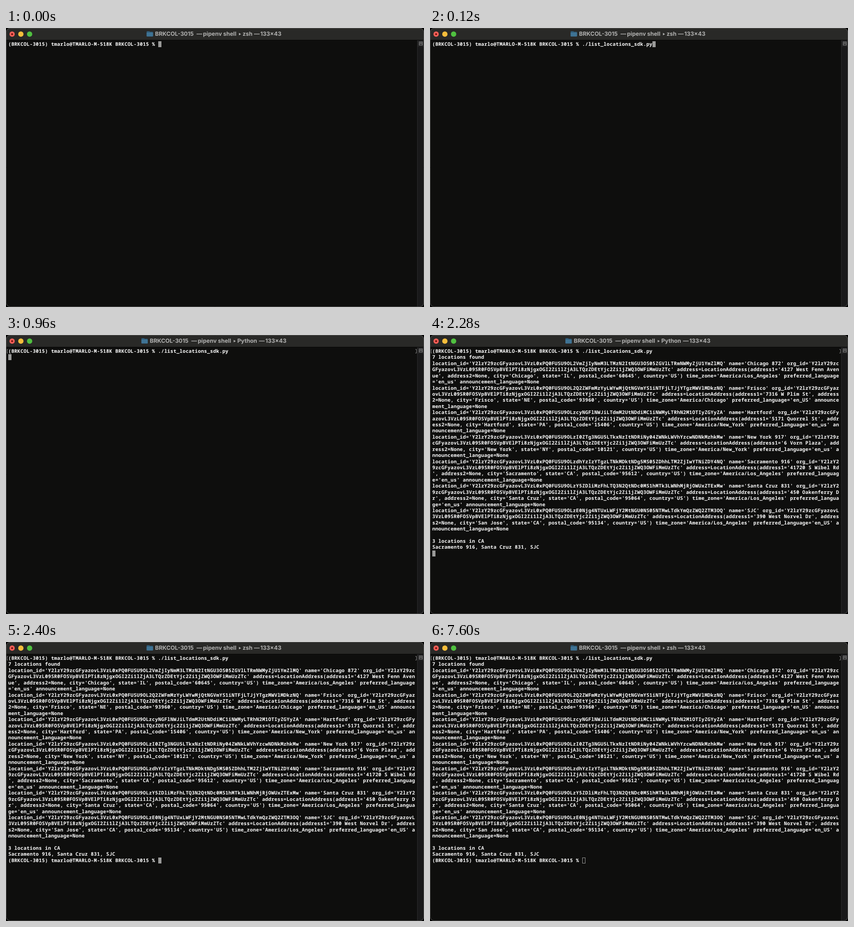
Animation, 917 px wide and 611 px high, one loop 9.36 s. Source, as an HTML page with a canvas:

```html
<!DOCTYPE html>
<html lang="en">
<head>
<meta charset="utf-8">
<title>Terminal</title>
<style>
  html, body { margin: 0; width: 100%; height: 100%; overflow: hidden; background: #000; }
  canvas { display: block; width: 917px; height: 611px; }
</style>
</head>
<body>
<canvas id="stage" width="917" height="611"></canvas>
<script>
const ctx = document.getElementById('stage').getContext('2d');
const W = 917, H = 611, LOOP = 9360;
const COLS = 133, CELL_W = 6.71, CELL_H = 13.42, LEFT = 4.8, TOP = 28.8;
const MONO = '600 10.7px "Noto Sans Mono", "DejaVu Sans Mono", monospace';
const SANS = '700 12.4px Inter, Roboto, sans-serif';

const PROMPT = '(BRKCOL-3015) tmarlo@TMARLO-M-518K BRKCOL-3015 % ';
const COMMAND = './list_locations_sdk.py';
const LOC = 'Y2lzY29zcGFyazovL3VzL0xPQ0FUSU9OL';
const ORG = 'Y2lzY29zcGFyazovL3VzL09SR0FOSVpBVElPTi8zNjgxOGI2Zi1lZjA3LTQzZDEtYjc2Zi1jZWQ3OWFiMmUzZTc';

// id, name, street, city, state, postal code, time zone, language
const places = [
  ['2VmZjIyNmM3LTMzN2ItNGU3OS05ZGVlLTRmNWMyZjU1YmZlMQ', 'Chicago 872', '4127 West Fenn Avenue', 'Chicago', 'IL', '60645', 'Los_Angeles', 'en_us'],
  ['2Q2ZWFmMzYyLWYwMjQtNGVmYS1iNTFjLTJjYTgzMWVlMDkzNQ', 'Frisco', '7316 W Plim St', 'Frisco', 'NE', '93960', 'Chicago', 'en_US'],
  ['zcyNGFlNWJiLTdmM2UtNDdiMC1iNWMyLTRhN2M1OTIyZGYyZA', 'Hartford', '5171 Quorrel St', 'Hartford', 'PA', '15406', 'New_York', 'en_us'],
  ['zI0ZTg3NGU5LTkxNzItNDRiNy04ZWNkLWVhYzcwNDNkMzhkMw', 'New York 917', '6 Vorn Plaza', 'New York', 'NY', '10121', 'New_York', 'en_us'],
  ['zdhYzIzYTgzLTNkMDktNDg5MS05ZDhhLTM2ZjIwYTNiZDY4NQ', 'Sacramento 916', '41720 S Wibel Rd', 'Sacramento', 'CA', '95612', 'Los_Angeles', 'en_us'],
  ['zY5ZDliMzFhLTQ3N2QtNDc0MS1hMTk3LWNhMjRjOWUxZTExMw', 'Santa Cruz 831', '450 Oakenferry Dr', 'Santa Cruz', 'CA', '95064', 'Los_Angeles', 'en_us'],
  ['zE0Njg4NTUxLWFjY2MtNGU0NS05NTMwLTdkYmQzZWQ2ZTM3OQ', 'SJC', '390 West Norvel Dr', 'San Jose', 'CA', '95134', 'Los_Angeles', 'en_US']
];

function describe([id, name, street, city, state, zip, zone, lang]) {
  return `location_id='${LOC}${id}' name='${name}' org_id='${ORG}' ` +
    `address=LocationAddress(address1='${street}', address2=None, city='${city}', ` +
    `state='${state}', postal_code='${zip}', country='US') time_zone='America/${zone}' ` +
    `preferred_language='${lang}' announcement_language=None`;
}

function wrap(text) {
  const rows = [];
  for (let i = 0; i < text.length; i += COLS) rows.push(text.slice(i, i + COLS));
  return rows;
}

const inCA = places.filter(p => p[4] === 'CA').map(p => p[1]);
const output = [
  `${places.length} locations found`,
  ...places.flatMap(p => wrap(describe(p))),
  '',
  `${inCA.length} locations in CA`,
  inCA.join(', ')
];

function rect(x, y, w, h, color) {
  ctx.fillStyle = color;
  ctx.fillRect(x, y, w, h);
}

function disc(x, y, r, color) {
  ctx.fillStyle = color;
  ctx.beginPath();
  ctx.arc(x, y, r, 0, Math.PI * 2);
  ctx.fill();
}

function line(color, ...pts) {
  ctx.strokeStyle = color;
  ctx.lineWidth = 1;
  ctx.beginPath();
  for (let i = 0; i < pts.length; i += 2) ctx.lineTo(pts[i], pts[i + 1]);
  ctx.stroke();
}

function drawRow(text, row) {
  ctx.font = MONO;
  ctx.fillStyle = '#fdfdfd';
  ctx.textAlign = 'center';
  const y = TOP + row * CELL_H + 10.2;
  for (let i = 0; i < text.length; i++) {
    if (text[i] !== ' ') ctx.fillText(text[i], LEFT + (i + 0.5) * CELL_W, y);
  }
}

function drawCursor(col, row, hollow) {
  const x = Math.round(LEFT + col * CELL_W), y = Math.round(TOP + row * CELL_H);
  rect(x, y, 7, 13, '#9a9a99');
  if (hollow) rect(x + 1, y + 1, 5, 11, '#0e0e0d');
}

function drawFolder(x) {
  ctx.fillStyle = '#2f5b78';
  ctx.beginPath();
  ctx.roundRect(x, 7, 7, 5, 1.2);
  ctx.roundRect(x, 8.3, 14, 10.2, 1.3);
  ctx.fill();
  ctx.fillStyle = '#3f7394';
  ctx.beginPath();
  ctx.roundRect(x, 10, 14, 8.5, 1.2);
  ctx.fill();
}

function drawTitle(program) {
  const python = program === 'Python';
  const x = python ? 315.5 : 327;
  const end = python ? 239.5 : 217;
  drawFolder(x - 18.5);
  ctx.font = SANS;
  ctx.textAlign = 'left';
  ctx.fillStyle = '#b1b1b0';
  const parts = [['BRKCOL-3015', 0], ['—', 91], ['pipenv shell', 105.3],
    [program, 192], ['—', end], ['133×43', end + 14]];
  for (const [text, dx] of parts) ctx.fillText(text, x + dx, 17.3);
  ctx.beginPath();
  ctx.moveTo(x + 184, 10.8);
  ctx.lineTo(x + 188.6, 13.4);
  ctx.lineTo(x + 184, 16);
  ctx.fill();
}

function drawWindow() {
  rect(0, 0, W, H, '#000');
  ctx.save();
  ctx.beginPath();
  ctx.roundRect(0, 0, W, H, 9);
  ctx.clip();
  rect(0, 0, W, H, '#0e0e0d');
  rect(0, 0, W, 26, '#292927');
  rect(0, 26, W, 1, '#050505');
  rect(902, 27, 15, H, '#19191a');
  rect(902, 27, 1, H, '#2b2b2c');
  rect(903, 27, 13, 14, '#222223');
  ctx.restore();

  ctx.strokeStyle = '#555554';
  ctx.lineWidth = 1;
  ctx.beginPath();
  ctx.roundRect(0.5, 0.5, W - 1, H - 1, 9);
  ctx.stroke();

  ctx.strokeStyle = '#8b8b8b';
  ctx.strokeRect(906.5, 30.5, 7, 7);
  line('#8b8b8b', 908, 32.5, 912, 32.5);
  line('#8b8b8b', 907, 34.5, 913, 34.5);

  disc(13.4, 13.4, 5.8, '#f25e57');
  disc(13.4, 13.4, 2, '#6b0d08');
  disc(32.6, 13.4, 5.8, '#f6bd3b');
  disc(51.8, 13.4, 5.8, '#50c140');
}

// Marks the edges of an entered command line.
function drawBrackets() {
  line('#868686', 4.5, 31.5, 2.5, 31.5, 2.5, 39.5, 4.5, 39.5);
  line('#868686', 898, 31.5, 900.5, 31.5, 900.5, 39.5, 898, 39.5);
}

const marks = [0, 120, 840, 960, 2280, 2320, 2400, 7600];

function draw(t) {
  const rows = [t < 120 ? PROMPT : PROMPT + COMMAND];
  if (t >= 2280) rows.push(...output);
  if (t >= 2320) rows.push(PROMPT);
  else if (t >= 840) rows.push('');

  drawWindow();
  drawTitle(t >= 960 && t < 2400 ? 'Python' : 'zsh');
  if (t >= 840) drawBrackets();
  rows.forEach(drawRow);
  const last = rows.length - 1;
  drawCursor(rows[last].length, last, t >= 7600);
}

ctx.textRendering = 'geometricPrecision';
const start = performance.now();
let shown = -1;

function tick() {
  const t = (performance.now() - start) % LOOP;
  const step = marks.filter(m => m <= t).length;
  if (step !== shown) {
    shown = step;
    draw(t);
  }
  requestAnimationFrame(tick);
}
tick();
</script>
</body>
</html>
```
